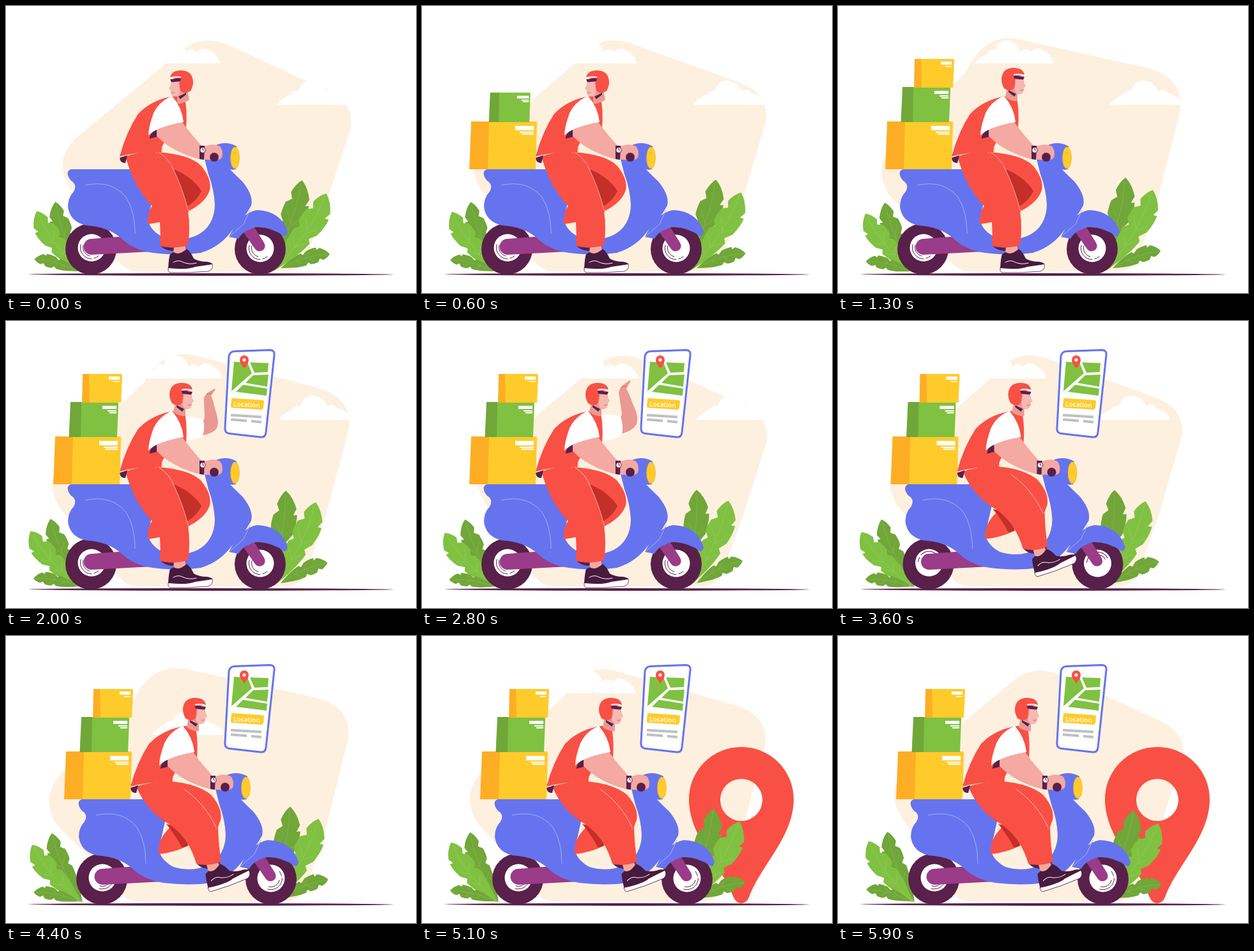
Animation of 642 by 450 pixels, one loop 6000 ms. Source, as an HTML page:

```html
<!DOCTYPE html>
<html lang="en">
<head>
<meta charset="utf-8">
<title>Scooter delivery</title>
<style>
html, body { margin: 0; width: 100%; height: 100%; overflow: hidden; background: #fff; }
svg { display: block; width: 642px; height: 450px; }
.blue { fill: #6673ee; } .red { fill: #f95045; } .shade { fill: #c42f28; }
.dark { fill: #58204a; } .skin { fill: #f4a9a2; } .pink { fill: #ea9992; }
.plum { fill: #9a3c89; } .white { fill: #fff; } .cream { fill: #fef0df; }
.leaf { fill: #80c141; } .moss { fill: #70a738; } .gold { fill: #ffcb2b; }
.line { fill: none; stroke: #fff; stroke-width: 1; stroke-linecap: round; }
.arc { fill: none; stroke: #58204a; stroke-width: 1; stroke-linecap: round; }
.pale { fill: none; stroke: #a5aef6; stroke-width: 1; }
.bar { fill: none; stroke: #bfc0c4; stroke-width: 4; }
text { font: 600 10px "Open Sans", Lato, sans-serif; fill: #fff; text-anchor: middle; }
</style>
</head>
<body>
<svg viewBox="0 0 642 450">
  <defs>
    <g id="leafShape">
      <path d="M0 0C.5-.15 .95-.3 1.12-.45L.85-.49 1.24-.57Q1.42-.7 1.3-.78L1-.77 1.15-.84Q.7-.95 0-1Q-.35-.95-.5-.85L-.22-.79-.62-.74Q-.7-.66-.62-.6L-.28-.55-.58-.5Q-.58-.35-.42-.25Q-.2-.1 0 0Z"/>
      <path d="M0 0Q.75-.6 0-.97M.3-.33L.8-.42M.4-.52L1-.62M.3-.33L-.25-.42M.4-.55L-.3-.66" fill="none" stroke="#fff" stroke-opacity=".15" stroke-width=".8" vector-effect="non-scaling-stroke"/>
    </g>
    <path id="wheelArcs" class="arc" d="M-17 -5A17.5 17.5 0 0 0 0 17.5M-13 -4A13.5 13.5 0 0 0 -3 13M4 16.5A17 17 0 0 0 11 13"/>
  </defs>

  <path id="blob" class="cream"/>
  <path id="cloudL" class="white" d="M215 90Q220 80 232 77Q236 66 246 69Q250 54 264 54Q281 55 285 72Q293 64 302 72Q312 62 322 70Q334 76 338 90Z"/>
  <path id="cloudR" class="white" d="M424 155Q431 145 445 139Q449 132 458 133Q463 117 478 117Q494 118 500 134Q509 127 516 137Q533 140 538 155Z"/>

  <path id="pin" class="red" fill-rule="evenodd" d="M488 410C470 360 418 315 418 256A82 82 0 0 1 582 256C582 315 530 360 512 410Q508 419 500 419Q492 419 488 410ZM467 257A33 33 0 1 0 533 257A33 33 0 1 0 467 257Z"/>

  <g id="leaves"></g>

  <g id="phone">
    <path d="M358 47.500L413 45.500Q421 45.500 420 54L407 175Q406 183 398 182L350 176.500Q342 175.500 343 167L349 56Q350 48 358 47.500Z" fill="#fff" stroke="#6673ee" stroke-width="3"/>
    <g class="leaf">
      <path d="M357 64L378 65 385 82 353 110Z"/>
      <path d="M382 65L411 66 410 80 389 81Z"/>
      <path d="M387 85L411 84 409 103 375 97Z"/>
      <path d="M371 100L409 106 408 117 360 111Z"/>
    </g>
    <path class="red" d="M373 74Q366 67 366 61A7 7 0 0 1 380 61Q380 67 373 74Z"/>
    <circle class="white" cx="373" cy="61" r="2.600"/>
    <path class="gold" d="M355 121L401 124Q404 124 404 127L403 137Q402 139 399 139L354 136Q352 136 352 133L353 123Q353 121 355 121Z"/>
    <text x="377" y="134.500" transform="rotate(3 377 131)">Location</text>
    <path class="bar" d="M352 147.500L400 150.500M352 154.500L377 156.500M384 157L400 158.500"/>
  </g>

  <g id="rider">
    <g id="boxes">
      <g>
        <path d="M77 181H107V256H74Z" fill="#fdae25"/><path class="gold" d="M105 181H178Q180 181 180 184L178 256H103Z"/>
        <path class="white" d="M146 188H175V195H146ZM153 197H175V199H153ZM156 200H175V202H156Z"/>
      </g>
      <g>
        <path d="M101 127H120V182H98.500Z" class="moss"/><path class="leaf" d="M118 127H174Q176 127 176 130L174 182H117Z"/>
        <path class="white" d="M151 133H173V138H151ZM159 140H173V142H159ZM162 143H173V145H162Z"/>
      </g>
      <g>
        <path d="M120 83H132V128H119Z" fill="#fdae25"/><path class="gold" d="M130 83H180Q182 83 182 86L180 128H131Z"/>
        <path class="white" d="M161 87H178V92H161ZM168 94H178V95.500H168Z"/>
      </g>
    </g>

    <g id="wave">
      <path class="pink" d="M308 151Q313 152 313 145L308 112Q310 103 318 98L325 93Q328 94 324 99L320 106Q325 115 330 130Q340 150 336 162Q330 172 312 177Z"/>
      <path class="line" d="M312 104L320 102" style="stroke:#c4706f"/>
      <path class="white" d="M276 147Q300 146 311 150Q316 163 313 178Q300 189 276 187Z"/>
    </g>

    <circle class="dark" cx="133" cy="381" r="40"/><circle class="white" cx="134" cy="379" r="21.500"/>
    <circle class="dark" cx="398" cy="381" r="40"/><circle class="white" cx="398" cy="380" r="21.500"/>
    <g class="spin" data-x="134" data-y="379"><use href="#wheelArcs"/></g>
    <g class="spin" data-x="398" data-y="380"><use href="#wheelArcs"/></g>
    <path class="plum" d="M134 365L188 361 228 385 134 390A12.500 12.500 0 0 1 134 365Z"/>
    <path class="plum" d="M370 352L387 344 404 371Q408 379 402 383Q395 387 390 381Z"/>

    <path class="blue" d="M103 256H240L222 335Q226 352 245 362Q275 371 300 359Q326 345 327 312Q326 288 317 264L311 240L345 250Q354 260 370 275Q388 297 384 313Q372 335 354 352Q335 378 305 387Q270 392 230 387Q200 383 180 364Q160 346 125 344Q100 338 97 315Q97 300 106 291Q112 280 102 274Q95 266 97 260Q99 256 103 256Z"/>
    <path class="blue" d="M349 362Q368 324 393 320Q430 321 441 354Q440 361 436 361Q412 345 390 347Q370 353 364 365Z"/>
    <path class="pale" d="M124 281Q165 272 188 300Q202 322 202 357M349 362L372 342L382 320"/>

    <path class="red" d="M240 300Q220 318 222 342Q248 339 268 329L262 300Z"/>
    <path class="shade" d="M234 295L268 300L268 329Q261 331 258 331Q250 314 234 295Z"/>
    <path class="red" d="M236 229Q285 232 304 249Q323 270 319 289Q312 309 285 322L262 258Z"/>
    <path class="shade" d="M262 256Q291 267 306 290Q300 304 284 314Z"/>
    <path id="hem" class="dark"/>
    <g id="shoe">
      <path class="skin" d="M263 372H280L283 394H262Z"/>
      <path class="white" d="M254 410L323 404Q325 413 317 416Q285 419 256 418Q253 416 254 410Z" stroke="#58204a" stroke-width=".8"/>
      <path fill="#481a3e" d="M254 411Q255 394 257 389L263 386Q270 392 283 381Q289 385 294 396Q302 401 315 401Q322 402 323 405Q310 407 296 409Q285 414 254 411Z"/>
      <path class="line" d="M262 402Q270 397 278 402Q288 406 298 403"/>
    </g>
    <path id="leg" class="red"/>
    <path id="seam" class="line" stroke-opacity=".55"/>

    <path class="dark" d="M178 238Q179 247 187 246L190 234Z"/>
    <path class="red" d="M264 141Q229 146 207 169Q188 198 178 236Q205 228 244 229Q240 210 282 191Q284 165 280 144Z"/>

    <g id="head">
      <path class="pink" d="M265 128H281V149Q272 150 262 143Z"/>
      <path class="pink" d="M271 112H290L291 120 294 126 291 128Q292 138 282 138Q272 136 271 126Z"/>
      <path d="M279 115H290L291 120 294 126 291 128Q292 138 283 138Q276 136 277 128Z" fill="#f7b8b1"/>
      <path class="dark" d="M267 132L279 138 276 142 267 135Z"/>
      <path class="red" d="M256 115Q257 97 275 97Q290 97 292 108L277 112Q278 123 275 130Q268 135 260 129Q256 122 256 115Z"/>
      <path class="dark" d="M275 109L292 111 290 115.500 276 114Z"/>
      <path d="M275 108Q284 106 292 109" fill="none" stroke="#fff" stroke-width="2"/>
      <path d="M285 132Q288 133 290 131" class="arc" style="stroke:#c4706f"/>
    </g>

    <path class="blue" d="M312 237Q318 224 331 217Q347 212 361 220L360 256Q348 259 337 250L318 246Z"/>
    <ellipse cx="358.500" cy="238" rx="7" ry="17" fill="#ffcb2b" stroke="#e9a827" stroke-width=".6"/>
    <path class="dark" d="M225 208Q225 199 236 193L240 204Z"/>
    <path class="skin" d="M236 191L276 182Q288 199 307 220L315 219Q325 215 335 220Q341 228 338 238Q332 244 317 241L302 240Q260 229 236 204Z"/>
    <path class="white" d="M260 141Q240 149 231 168Q223 190 223 203Q236 189 278 182Q276 160 260 141Z"/>
    <path class="dark" d="M303 219L311 219 310 241 303 240Z"/>
    <circle class="white" cx="308" cy="226" r="4.200" stroke="#58204a" stroke-width="1"/>
    <path class="arc" d="M308 223V226H310"/>
    <circle class="dark" cx="326" cy="237" r="7"/>
  </g>

  <path class="dark" d="M34 420.500Q70 419 321 419Q570 419 608 421Q570 422.500 321 423Q70 422.500 34 420.500Z"/>
</svg>
<script>
const LOOP = 6000, STEP = 100;
const $ = id => document.getElementById(id);
const lerp = (a, b, k) => a + (b - a) * k;
const span = (t, a, b) => Math.min(1, Math.max(0, (t - a) / (b - a)));
const ease = k => k * k * (3 - 2 * k);
const ramp = (t, a, b) => ease(span(t, a, b));
const pop = (t, a, b) => {
  const k = span(t, a, b) - 1;
  return 1 + 2.4 * k * k * k + 1.4 * k * k;
};
const place = (el, value) => el.setAttribute('transform', value);
const scaleAt = (el, x, y, s) =>
  place(el, `translate(${x} ${y}) scale(${Math.max(0, s)}) translate(${-x} ${-y})`);

// Blends two paths that share the same commands.
const NUM = /-?[\d.]+/g;
function blend(el, [from, to], k) {
  const end = to.match(NUM);
  let i = 0;
  el.setAttribute('d', from.replace(NUM, n => lerp(+n, +end[i++], k).toFixed(2)));
}

// Position along [time, value] pairs.
function track(t, keys) {
  let i = 0;
  while (i < keys.length - 2 && t >= keys[i + 1][0]) i++;
  const [t0, v0] = keys[i], [t1, v1] = keys[i + 1];
  return lerp(v0, v1, span(t, t0, t1));
}

const SHAPES = {
  blob: [
    'M112 205L275 70Q308 43 350 62L500 131Q545 150 540 190L503 305L470 395Q462 414 440 416L200 416Q178 412 165 380L100 285Q72 240 112 205Z',
    'M90 212L197 105Q226 40 282 52L480 95Q545 110 535 165L500 305L470 395Q462 414 440 416L200 416Q178 412 165 380L80 298Q50 250 90 212Z'],
  leg: [
    'M187 236Q215 226 240 230Q256 240 263 258Q278 290 285 320Q289 350 285 375Q262 382 241 376Q243 340 238 322Q203 293 187 236Z',
    'M187 236Q215 226 250 229Q300 235 312 264Q322 282 315 300Q316 330 320 354Q300 362 281 357Q270 318 240 296Q203 275 187 236Z'],
  seam: [
    'M240 230Q256 240 263 258Q278 290 285 320',
    'M262 240Q280 253 292 268Q304 283 313 302'],
  hem: [
    'M241 374L285 374Q276 381 264 384Q247 384 241 374Z',
    'M281 355L320 353Q315 362 303 365Q286 365 281 355Z']
};

const CLOUD_L = [[0, -3], [1300, 0], [2800, 1], [3600, -12], [4000, -130], [4399, -300], [4400, 312], [5100, -3], [5900, -363]];
const CLOUD_R = [[0, 0], [1300, 1], [2800, 5], [3600, -18], [4400, -196], [5100, -485], [5900, -800]];

// base x, base y, length, half width (sign sets the bow), rest angle, swayed angle, colour
const LEAVES = [
  [408, 418, 155, 19, 21, 8, 'moss'],
  [420, 415, 146, 20, 34, 24, 'leaf'],
  [430, 411, 80, -12, 74, 64, 'moss'],
  [120, 418, 119, -15, -21, -26.4, 'moss'],
  [118, 418, 119, -17, -36, -44, 'leaf'],
  [115, 416, 73, 10, -75, -82, 'moss']
].map(([x, y, len, half, rest, sway, tone]) => {
  const el = document.createElementNS('http://www.w3.org/2000/svg', 'use');
  el.setAttribute('href', '#leafShape');
  el.setAttribute('class', tone);
  $('leaves').append(el);
  return k => place(el, `translate(${x} ${y}) rotate(${lerp(rest, sway, k)}) scale(${half} ${len})`);
});

const BOXES = [[127, 256, 200], [137, 182, 500], [150, 128, 800]];
const boxes = [...$('boxes').children];
const wheels = [...document.querySelectorAll('.spin')];

function draw(t) {
  const swing = period => (1 - Math.cos(t / period * 2 * Math.PI)) / 2;

  blend($('blob'), SHAPES.blob, swing(3000));
  LEAVES.forEach(bend => bend(swing(LOOP)));
  place($('cloudL'), `translate(${track(t, CLOUD_L)})`);
  place($('cloudR'), `translate(${track(t, CLOUD_R)})`);

  BOXES.forEach(([x, y, at], i) => scaleAt(boxes[i], x, y, pop(t, at, at + 350)));
  scaleAt($('phone'), 382, 114, pop(t, 1500, 2000));
  scaleAt($('pin'), 500, 419, pop(t, 4450, 5000));

  const reach = ramp(t, 1600, 2100) * (1 - ramp(t, 2900, 3300));
  place($('wave'), `translate(276 167) rotate(${60 * (1 - reach)}) scale(${reach}) translate(-276 -167)`);

  const turn = ramp(t, 600, 1000);
  const drive = ramp(t, 3000, 4200);
  place($('head'), `translate(${274.5 + 4 * drive} ${4 * (1 - turn)}) scale(${lerp(-1, 1, turn)} 1) translate(-274.5)`);
  place($('rider'), `translate(${17 * drive})`);
  for (const w of wheels) place(w, `translate(${w.dataset.x} ${w.dataset.y}) rotate(${270 * drive})`);

  const lift = ramp(t, 2900, 3500);
  for (const id of ['leg', 'seam', 'hem']) blend($(id), SHAPES[id], lift);
  place($('shoe'), `translate(${47 * lift} ${-17 * lift}) rotate(${-18 * lift} 256 416)`);
}

const start = performance.now();
function tick(now) {
  const t = Math.max(0, now - start) % LOOP;
  draw(Math.floor(t / STEP) * STEP);
  requestAnimationFrame(tick);
}
draw(0);
requestAnimationFrame(tick);
</script>
</body>
</html>
```
